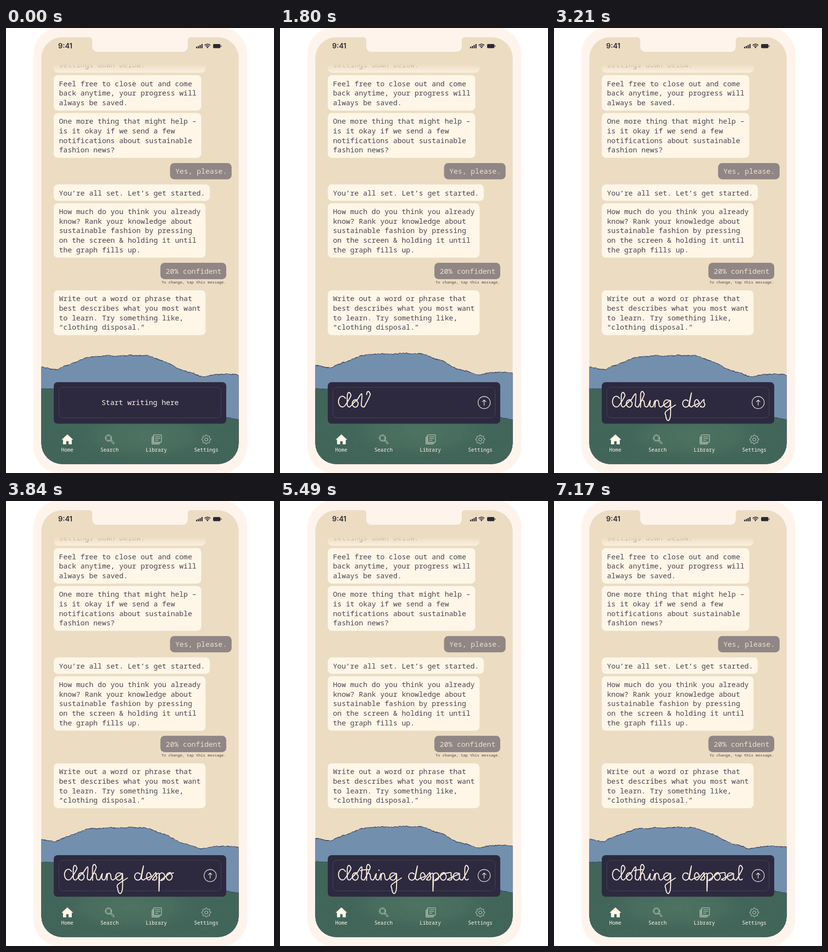
Recreate the animation shown at these times as an HTML page. Size 550 px wide and 916 px high, loop 7.2 s.

```html
<!DOCTYPE html>
<html lang="en">
<head>
<meta charset="utf-8">
<title>Chat with handwriting</title>
<style>
html, body { margin: 0; width: 100%; height: 100%; overflow: hidden; background: #fff; }
svg { display: block; width: 100%; height: 100%; }
text { font-family: "Noto Sans Mono", "DejaVu Sans Mono", monospace; font-size: 14.7px; fill: #4c4350; white-space: pre; }
.reply { fill: #efe1cc; }
.note { font-size: 7.9px; }
.tab { font-size: 10.4px; font-weight: 500; fill: #fff6e8; text-anchor: middle; }
.clock { font: 600 14.5px Inter, Roboto, sans-serif; fill: #2b2833; }
.prompt { fill: #fff4e6; }
.icon { fill: none; stroke: #dfe2d2; stroke-width: .9; stroke-linecap: round; stroke-linejoin: round; }
.ink { fill: none; stroke: #fff1df; stroke-width: 2; stroke-linecap: round; stroke-linejoin: round; }
</style>
</head>
<body>
<svg viewBox="0 0 550 916">
  <defs>
    <clipPath id="screen"><rect x="72.5" y="19" width="405" height="878.5" rx="43"/></clipPath>
    <linearGradient id="fade" x1="0" y1="74" x2="0" y2="98" gradientUnits="userSpaceOnUse">
      <stop offset="0" stop-color="#000"/><stop offset="1" stop-color="#fff"/>
    </linearGradient>
    <mask id="top" maskUnits="userSpaceOnUse" x="73" y="50" width="404" height="60">
      <rect x="73" y="50" width="404" height="60" fill="url(#fade)"/>
    </mask>
    <radialGradient id="glow">
      <stop offset="0" stop-color="#4e7362"/><stop offset=".6" stop-color="#4a6f5f" stop-opacity=".8"/>
      <stop offset="1" stop-color="#43685a" stop-opacity="0"/>
    </radialGradient>
  </defs>

  <rect x="56" y="-3" width="439.5" height="921" rx="58" fill="#fff4ec"/>
  <rect x="72.5" y="19" width="405" height="878.5" rx="43" fill="#ecdcc2"/>
  <path d="M169 18Q177 19 177 26V37Q177 49 189 49H361Q373 49 373 37V26Q373 19 381 18Z" fill="#fff4ec"/>

  <text class="clock" x="107" y="42">9:41</text>
  <g fill="#2b2833">
    <path d="M390 38.5h2.4v3.2h-2.4zM393.7 37h2.4v4.7h-2.4zM397.3 35h2.4v6.7h-2.4zM401 33h2.4v8.7h-2.4z"/>
    <rect x="425" y="33" width="15" height="8.6" rx="2"/>
    <rect x="441" y="35.6" width="1.2" height="3.4" rx=".6"/>
    <path d="M411.3 39.4Q413.5 37.6 415.7 39.4L413.5 41.8Z"/>
  </g>
  <path d="M407.5 35.6Q413.5 30.6 419.5 35.6M409.7 37.9Q413.5 34.8 417.3 37.9" fill="none" stroke="#2b2833" stroke-width="1.6"/>

  <g id="chat"></g>
  <g id="land" clip-path="url(#screen)"></g>

  <rect x="98" y="729" width="354" height="85.5" rx="8" fill="#2d2a40"/>
  <rect x="108.5" y="739.5" width="333" height="63" rx="9" fill="none" stroke="#85808c" stroke-width=".7" stroke-dasharray="1 1.4"/>
  <text id="prompt" class="prompt" x="196" y="776">Start writing here</text>
  <g id="send" fill="none" stroke="#efe6da" stroke-width="1.3" stroke-linecap="round" stroke-linejoin="round">
    <circle cx="419" cy="771" r="12.5"/>
    <path d="M419 776.5V766M415.3 769.4L419 765.7L422.7 769.4"/>
  </g>
  <g id="writing" class="ink"></g>

  <path d="M126 836.5L138 847.5H135V857H128.5V850.5H123.5V857H117V847.5H114Z" fill="#fff6e8"/>
  <g class="icon">
    <circle cx="210.3" cy="844" r="6.5"/><circle cx="210.3" cy="844" r="4.6" stroke-width=".6"/>
    <path d="M215 849L216.5 848L222.3 854.5L220.5 856.3L214.5 850Z"/>
    <path d="M303.5 837.5H319V852.5H303.5ZM301.5 840V854.5H316.5M299.5 842V856.5H314.5M306.5 841.5H316M306.5 845H316M306.5 848.5H312"/>
    <path id="gear"/><circle cx="411" cy="847" r="3.3"/>
  </g>
  <text class="tab" x="125.7" y="871.5">Home</text>
  <text class="tab" x="212.5" y="871.5">Search</text>
  <text class="tab" x="308.5" y="871.5">Library</text>
  <text class="tab" x="411" y="871.5">Settings</text>
</svg>
<script>
const LOOP = 7200, POSES = 4, POSE_MS = LOOP / 56;
const $ = id => document.getElementById(id);
const TAU = Math.PI * 2;

function add(parent, tag, attrs, text) {
  const el = document.createElementNS("http://www.w3.org/2000/svg", tag);
  for (const k in attrs) el.setAttribute(k, attrs[k]);
  if (text) el.textContent = text;
  return parent.appendChild(el);
}

function random(seed) {
  return () => {
    seed = (seed * 1664525 + 1013904223) >>> 0;
    return seed / 4294967296;
  };
}

// Linear interpolation through key points
function ramp(keys, x) {
  if (x <= keys[0][0]) return keys[0][1];
  for (let i = 1; i < keys.length; i++) {
    const [a, b] = [keys[i - 1], keys[i]];
    if (x < b[0]) return a[1] + (b[1] - a[1]) * (x - a[0]) / (b[0] - a[0]);
  }
  return keys[keys.length - 1][1];
}

// Chat bubbles sized by their text and stacked; replies give their right edge
const CHAR = 8.82, LINE = 19.6;
const messages = [
  { text: "settings down below.".padEnd(33), faded: true },
  { text: "Feel free to close out and come\nback anytime, your progress will\nalways be saved." },
  { text: "One more thing that might help –\nis it okay if we send a few\nnotifications about sustainable\nfashion news?" },
  { text: "Yes, please.", right: 463 },
  { text: "You’re all set. Let’s get started." },
  { text: "How much do you think you already\nknow? Rank your knowledge about\nsustainable fashion by pressing\non the screen & holding it until\nthe graph fills up." },
  { text: "20% confident", right: 452, note: "To change, tap this message." },
  { text: "Write out a word or phrase that\nbest describes what you most want\nto learn. Try something like,\n“clothing disposal.”" }
];

let y = 58.5;
messages.forEach(({ text, right, note, faded }, i) => {
  const lines = text.split("\n");
  const width = Math.max(...lines.map(l => l.length)) * CHAR + 20.5;
  const height = lines.length * LINE + 14;
  const x = right ? right - width : 98;
  const g = add($("chat"), "g", faded ? { mask: "url(#top)" } : {});
  add(g, "rect", { x, y, width, height, rx: 8.5, fill: right ? "#908685" : "#fff6e8" });
  lines.forEach((line, k) => add(g, "text",
    { x: x + 10.8, y: y + 22.5 + k * LINE, class: right ? "reply" : "" }, line));
  if (note) add(g, "text", { x: 319, y: y + height + 9.5, class: "note" }, note);
  const next = messages[i + 1];
  y += height + (note ? 23 : right || next?.right ? 10.6 : 5);
});

// Torn-paper hills
const RIDGE = [[60, 697], [104, 702], [150, 683], [180, 675], [285, 673], [330, 688], [350, 700], [400, 717], [450, 711], [490, 716]];
const FIELD = [[60, 742], [98, 742], [452, 801], [490, 808]];

function tear(g, height, rough, fill, rnd) {
  let edge = "", face = "";
  for (let x = 70; x <= 480; x += 3) {
    const top = height(x) + (rnd() - .5) * rough;
    edge += `L${x} ${top.toFixed(1)}`;
    face += `L${x} ${(top + .6 + rnd() * rough * .6).toFixed(1)}`;
  }
  const close = p => "M70 920" + p + "L480 920Z";
  add(g, "path", { d: close(edge), fill: "#3a3f58" });
  add(g, "path", { d: close(face), fill });
}

function grain(g, top, color, opacity, rnd) {
  let d = "";
  for (let i = 0; i < 450; i++) {
    const x = 73 + rnd() * 405, from = top(x);
    d += `M${x.toFixed(1)} ${(from + rnd() * (900 - from)).toFixed(1)}h1v1h-1z`;
  }
  add(g, "path", { d, fill: color, opacity });
}

const land = Array.from({ length: POSES }, (_, i) => {
  const rnd = random(91 + i * 37);
  const g = add($("land"), "g", {});
  const dx = 2 * Math.cos(Math.PI * i);
  const dy = 2 * Math.cos(Math.PI / 2 * i) - 2;
  const ridge = x => ramp(RIDGE, x - dx) + dy + Math.sin(x / 7) * .7;
  tear(g, ridge, 2, "#728fae", rnd);
  grain(g, x => ridge(x) + 4, "#6684a5", .4, rnd);
  tear(g, x => ramp(FIELD, x) + i % 2, 1.2, "#42655a", rnd);
  add(g, "ellipse", { cx: 270 + dx * 8, cy: 840 + dy * 2, rx: 150, ry: 52, fill: "url(#glow)" });
  grain(g, () => 814, "#6a8d78", .3, rnd);
  grain(g, () => 814, "#365749", .35, rnd);
  return g;
});

// Pen strokes relative to a letter's left edge and baseline; angles in turns
function arc(cx, cy, rx, ry, from, to) {
  const n = Math.ceil(Math.abs(to - from) * 10);
  return Array.from({ length: n + 1 }, (_, i) => {
    const a = TAU * (from + (to - from) * i / n);
    return [cx + rx * Math.cos(a), cy + ry * Math.sin(a)];
  });
}
const bowl = () => arc(6.5, -7, 6.5, 7.5, -.12, -.95);
const foot = x => arc(x + 4, -5, 4, 5, .5, .1);
const loop = top => arc(4.5, 8 - top, 3.5, 8, 0, -.5);
const hump = x => [[x, 0], ...arc(x + 4, -6, 4, 8, .5, 1), ...foot(x + 8)];

const LETTERS = {
  c: arc(8, -11, 8, 11, -.1, -.88),
  l: [...loop(30), ...foot(1)],
  o: arc(6.5, -7, 6, 7.5, -.2, -1.15),
  t: [[5, -27], ...foot(4)],
  h: [...loop(32), ...hump(1)],
  i: [[2, -13], ...foot(1)],
  n: [[1, -13], ...hump(1)],
  g: [...bowl(), [14, -13], ...arc(9, 14, 5, 14, 0, .55), [24, -4]],
  d: [...bowl(), [18, -29], ...foot(14)],
  e: arc(5, -7.5, 4.5, 7.5, 0, -.85),
  s: [[7, -15], ...arc(5, -5, 4.5, 5.5, -.15, .4)],
  p: [[2, -13], [2, 23], ...arc(8, -7, 6, 7.5, .5, 1.3)],
  a: [...bowl(), [13, -13], ...foot(13)]
};

function curve(p) {
  let d = `M${p[0]}`;
  for (let i = 0; i < p.length - 1; i++) {
    const [a, b, c, e] = [p[Math.max(i - 1, 0)], p[i], p[i + 1], p[Math.min(i + 2, p.length - 1)]];
    d += `C${b.map((v, k) => v + (c[k] - a[k]) / 6)} ${c.map((v, k) => v - (e[k] - b[k]) / 6)} ${c}`;
  }
  return d;
}

// keys: [time, letters written]; marks: path length after each letter
function makeWord(word, left, keys) {
  const path = add($("writing"), "path", {});
  const points = [], marks = [0];
  for (const ch of word) {
    const shape = LETTERS[ch];
    points.push(...shape.map(([px, py]) => [left + px, 780 + py]));
    left += Math.max(...shape.map(p => p[0])) + 2.6;
    path.setAttribute("d", curve(points));
    marks.push(path.getTotalLength());
  }
  return { path, keys, marks };
}

function makeMark(d, from, to) {
  const path = add($("writing"), "path", { d });
  return { path, keys: [[from, 0], [to, 1]], marks: [0, path.getTotalLength()] };
}

const strokes = [
  makeWord("clothing", 120, [[850, 0], [1170, 1.36], [2430, 7.4], [2700, 8]]),
  makeWord("desposal", 264, [[2800, 0], [3210, 3], [4530, 7.36], [4720, 8]]),
  makeMark("M165 761Q173 758 182 759", 4850, 4980),
  makeMark("M202.5 759.5L203.5 760.5", 5130, 5160)
];

function drawStroke({ path, keys, marks }, t) {
  const done = ramp(keys, t);
  const length = ramp(marks.map((m, i) => [i, m]), done);
  path.style.visibility = done > 0 ? "visible" : "hidden";
  path.setAttribute("stroke-dasharray", `${length} 5000`);
}

const teeth = Array.from({ length: 32 }, (_, i) => {
  const r = i % 4 < 2 ? 9.3 : 7.2, a = (i - .5) * TAU / 32;
  return [411 + r * Math.cos(a), 847 + r * Math.sin(a)];
});
$("gear").setAttribute("d", "M" + teeth.join("L") + "Z");

function frame() {
  const t = performance.now() % LOOP;
  const pose = Math.floor(t / POSE_MS) % POSES;
  land.forEach((g, i) => g.style.display = i === pose ? "" : "none");
  $("prompt").style.opacity = ramp([[400, 1], [600, 0]], t);
  $("send").style.opacity = ramp([[500, 0], [700, 1]], t);
  strokes.forEach(s => drawStroke(s, t));
  requestAnimationFrame(frame);
}
frame();
</script>
</body>
</html>
```
